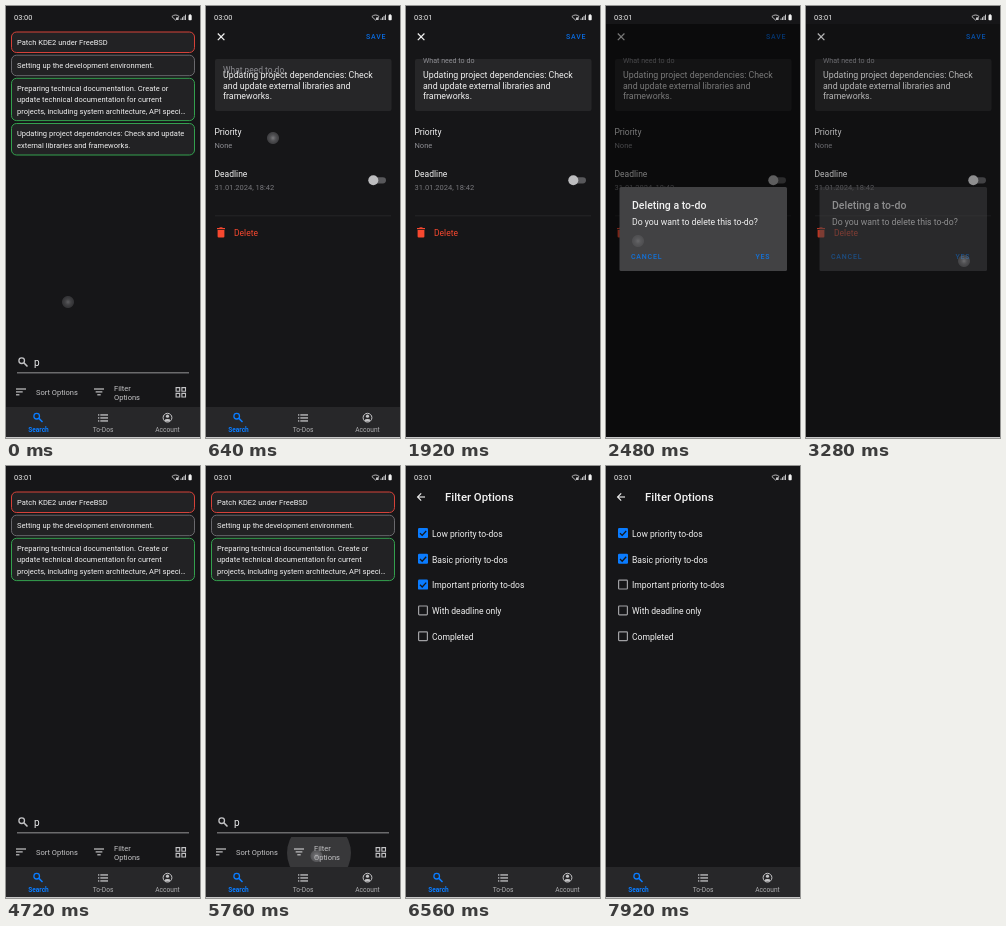
Animation of 194x432 px, one loop 8 s. Source, as an HTML page with a canvas:

```html
<!DOCTYPE html>
<html lang="en">
<head>
<meta charset="utf-8">
<title>To-do app</title>
<style>
html, body { margin: 0; width: 100%; height: 100%; overflow: hidden; background: #161618; }
canvas { display: block; width: 194px; height: 432px; }
</style>
</head>
<body>
<canvas id="stage"></canvas>
<script>
const W = 194, H = 432, LOOP = 8000, STEP = 80;
const BG = '#161618', BLUE = '#0a7cff', GRAY = '#8e8e93', WHITE = '#f2f2f2', LIGHT = '#c4c4c6';
const canvas = document.getElementById('stage');
const ctx = canvas.getContext('2d');
const dpr = window.devicePixelRatio || 1;
canvas.width = W * dpr;
canvas.height = H * dpr;

const ramp = (t, from, to) => Math.min(1, Math.max(0, (t - from) / (to - from)));
const easeOut = p => 1 - (1 - p) ** 2;
const between = (t, from, to) => t >= from && t < to;

function withAlpha(alpha, draw) {
  if (alpha <= 0) return;
  ctx.save();
  ctx.globalAlpha *= alpha;
  draw();
  ctx.restore();
}

// y is the vertical middle of the capital letters
function text(str, x, y, size, color = WHITE, { weight = 400, align = 'left', spacing = 0 } = {}) {
  ctx.font = `${weight} ${size}px Roboto, sans-serif`;
  ctx.textAlign = align;
  ctx.letterSpacing = spacing + 'px';
  ctx.fillStyle = color;
  ctx.fillText(str, x, y + size * 0.355);
}

function rect(x, y, w, h, color) {
  ctx.fillStyle = color;
  ctx.fillRect(x, y, w, h);
}

function rounded(x, y, w, h, r, fill, stroke, lineWidth = 1) {
  ctx.beginPath();
  ctx.roundRect(x, y, w, h, r);
  if (fill) { ctx.fillStyle = fill; ctx.fill(); }
  if (stroke) { ctx.strokeStyle = stroke; ctx.lineWidth = lineWidth; ctx.stroke(); }
}

function line(points, color, width = 1) {
  ctx.beginPath();
  points.forEach(([x, y]) => ctx.lineTo(x, y));
  ctx.strokeStyle = color;
  ctx.lineWidth = width;
  ctx.stroke();
}

function disc(x, y, r, color) {
  ctx.beginPath();
  ctx.arc(x, y, r, 0, 7);
  ctx.fillStyle = color;
  ctx.fill();
}

function ring(x, y, r, color, width) {
  ctx.beginPath();
  ctx.arc(x, y, r, 0, 7);
  ctx.strokeStyle = color;
  ctx.lineWidth = width;
  ctx.stroke();
}

function magnifier(x, y, color) {
  ring(x - 1.3, y - 1.3, 2.8, color, 1.3);
  line([[x + 0.9, y + 0.9], [x + 4.5, y + 4.5]], color, 1.5);
}

function touch(x, y, strength = 1) {
  const glow = ctx.createRadialGradient(x, y, 0, x, y, 6.5);
  glow.addColorStop(0, 'rgba(205,205,208,.55)');
  glow.addColorStop(0.45, 'rgba(170,170,174,.4)');
  glow.addColorStop(0.85, 'rgba(150,150,154,.32)');
  glow.addColorStop(1, 'rgba(150,150,154,0)');
  withAlpha(strength, () => disc(x, y, 6.5, glow));
}

function statusBar(t) {
  text(t < 1920 ? '03:00' : '03:01', 8, 11.2, 7.4, WHITE);
  ctx.beginPath();
  ctx.moveTo(169.5, 14);
  ctx.arc(169.5, 14, 5, -Math.PI * 0.76, -Math.PI * 0.24);
  ctx.closePath();
  ctx.strokeStyle = LIGHT;
  ctx.lineWidth = 0.9;
  ctx.stroke();
  rect(170, 11.5, 2.6, 2.5, LIGHT);
  for (let i = 0; i < 4; i++) rect(174.5 + i * 1.5, 12.5 - i * 1.3, 1, 1.5 + i * 1.3, LIGHT);
  rounded(182.5, 9, 3.2, 5.2, 0.7, WHITE);
  rect(183.4, 8.2, 1.4, 1, WHITE);
}

function tabBar() {
  rect(0, 401, W, 30, '#272729');
  magnifier(32, 411.5, BLUE);
  text('Search', 32.5, 423.3, 6.6, BLUE, { weight: 700, align: 'center' });
  for (let i = 0; i < 3; i++) {
    const y = 408.3 + i * 3;
    rect(92, y, 1.3, 1.3, LIGHT);
    rect(94.3, y, 7.7, 1.3, LIGHT);
  }
  text('To-Dos', 97, 423.3, 6.6, '#adadaf', { align: 'center' });
  ring(161.5, 411.7, 4.4, LIGHT, 1);
  disc(161.5, 410.2, 1.6, LIGHT);
  ctx.beginPath();
  ctx.ellipse(161.5, 414.2, 2.8, 1.3, 0, 0, 7);
  ctx.fill();
  text('Account', 161.5, 423.3, 6.6, '#adadaf', { align: 'center' });
}

function card(y, h, color, lines) {
  rounded(5.5, y, 183, h, 5, '#222224', color, 0.95);
  lines.forEach((str, i) => text(str, 11, y + 10.3 + i * 11.2, 7.53));
}

function sortIcon(x, y, centered) {
  [10, 6.7, 3.4].forEach((w, i) =>
    rect(centered ? x - w / 2 : x - 5, y - 3.6 + i * 2.9, w, 1.2, LIGHT));
}

function listScreen(lastCard) {
  rect(0, 18, W, 383, BG);
  card(26, 20.5, '#e0443a', ['Patch KDE2 under FreeBSD']);
  card(49.2, 20.5, '#6e6e72', ['Setting up the development environment.']);
  card(72.3, 42.3, '#35a852', [
    'Preparing technical documentation. Create or',
    'update technical documentation for current',
    'projects, including system architecture, API speci…']);
  withAlpha(lastCard, () => card(117.5, 31.5, '#35a852', [
    'Updating project dependencies: Check and update',
    'external libraries and frameworks.']));
  magnifier(17, 356, LIGHT);
  text('p', 28, 356.3, 10);
  rect(11, 366.4, 172, 0.9, '#a2a2a5');
  sortIcon(15, 386, false);
  text('Sort Options', 30, 386.3, 7.53, LIGHT);
}

function listActions() {
  sortIcon(93, 386, true);
  text('Filter', 108, 382, 7.53, LIGHT);
  text('Options', 108, 391, 7.53, LIGHT);
  for (const x of [170.1, 175.9])
    for (const y of [381.6, 387.4]) rounded(x, y, 3.6, 3.6, 0, null, LIGHT, 1.1);
}

function filterRipple(t) {
  if (!between(t, 5760, 6240)) return;
  ctx.save();
  ctx.beginPath();
  ctx.rect(78, 371, 77, 30);
  ctx.clip();
  const grow = ramp(t, 5760, 5920);
  withAlpha(1 - ramp(t, 6000, 6240), () => disc(113 + 3 * grow, 387, 32 + 12 * grow, '#38383a'));
  ctx.restore();
}

function floatingLabel(p) {
  text('What need to do', 17, 67 - 13 * p, 8.8 - 1.7 * p, GRAY);
}

function editScreen(t) {
  rect(0, 18, W, 383, BG);
  line([[11.8, 27.5], [18.4, 34.1]], WHITE, 1.2);
  line([[18.4, 27.5], [11.8, 34.1]], WHITE, 1.2);
  text('SAVE', 160, 31, 7, '#0a6be0', { weight: 500, spacing: 0.8 });
  rounded(9, 53, 176.5, 52, 2, '#262628');
  floatingLabel(easeOut(ramp(t, 620, 800)));
  ['Updating project dependencies: Check', 'and update external libraries and', 'frameworks.']
    .forEach((str, i) => text(str, 17, 69 + i * 10.6, 8.8));
  text('Priority', 8.5, 126.2, 8.5);
  text('None', 8.5, 139.3, 7.53, GRAY);
  text('Deadline', 8.5, 168, 8.5);
  text('31.01.2024, 18:42', 8.5, 181.2, 7.53, '#77777b');
  rounded(164, 171.2, 16, 6.2, 3.1, '#58585b');
  disc(167.3, 174.3, 5, '#bdbdbf');
  rect(9, 209.5, 176, 0.7, '#2b2b2d');
  const red = '#f7482f';
  rect(11, 222, 8, 1.2, red);
  rect(13.5, 221.3, 3, 1, red);
  rounded(11.6, 224, 6.8, 7.6, [0, 0, 1, 1], red);
  text('Delete', 28, 227, 8.5, red);
}

function dialog() {
  rect(0, 18, W, 414, 'rgba(0,0,0,.5)');
  rounded(13.5, 181, 167.5, 84, 1.5, '#424244');
  text('Deleting a to-do', 26, 199, 10.5, WHITE, { weight: 500 });
  text('Do you want to delete this to-do?', 26, 216, 8.68);
  const button = { weight: 500, spacing: 0.8 };
  text('CANCEL', 25, 251, 7, '#1273dc', button);
  text('YES', 149.5, 251, 7, '#1273dc', button);
}

function checkbox(y, label, checked) {
  if (checked) {
    rounded(12, y - 5, 10, 10, 1.2, BLUE);
    line([[14, y + 0.2], [16.2, y + 2.4], [20.2, y - 2]], BG, 1.3);
  } else {
    rounded(12.6, y - 4.4, 8.8, 8.8, 0.8, null, '#a0a0a3', 1.2);
  }
  text(label, 26, y + 0.8, 8.55);
}

function filterScreen(t) {
  rect(0, 18, W, 383, BG);
  line([[19, 31], [11.8, 31]], WHITE, 1.1);
  line([[15.2, 27.4], [11.6, 31], [15.2, 34.6]], WHITE, 1.1);
  text('Filter Options', 39, 31.3, 11.4, WHITE, { weight: 500 });
  const ripple = easeOut(ramp(t, 7360, 7600));
  if (t >= 7440)
    withAlpha(0.16 * (1 - ramp(t, 7600, 7920)), () => disc(20, 118.5, 14 * ripple, '#fff'));
  ['Low priority to-dos', 'Basic priority to-dos', 'Important priority to-dos', 'With deadline only', 'Completed']
    .forEach((label, i) => checkbox(67 + i * 25.8, label, i < 2 || (i === 2 && t < 7520)));
}

function touches(t) {
  if (t < 160) touch(62, 296, t < 80 ? 0.72 : 0.3);
  if (between(t, 480, 800)) touch(67, 132, t < 720 ? 1 : 0.4);
  if (between(t, 2160, 2560)) touch(32, 235, 0.5);
  if (between(t, 3200, 3520)) touch(158, 255, 0.75);
  if (between(t, 5200, 6160)) touch(110.5, 390, t < 5760 ? 0.8 : t < 6080 ? 1.3 : 0.5);
  if (between(t, 7040, 7840)) touch(19.5, 120, 0.8);
}

function render(t) {
  ctx.setTransform(dpr, 0, 0, dpr, 0, 0);
  rect(0, 0, W, H, BG);

  const editShown = ramp(t, 480, 640) * (1 - ramp(t, 3280, 3440));
  const tabs = 1 - ramp(t, 640, 800) + ramp(t, 3280, 3440);
  const lastCard = t < 3200 ? 1 : 1 - ramp(t, 3240, 3490);

  if (editShown < 1) {
    listScreen(lastCard);
    filterRipple(t);
    listActions();
  }
  withAlpha(editShown, () => editScreen(t));
  withAlpha(easeOut(ramp(t, 6080, 6480)), () => filterScreen(t));
  withAlpha(tabs, tabBar);
  withAlpha(ramp(t, 2240, 2480) * (1 - ramp(t, 3200, 3360)), dialog);

  statusBar(t);
  touches(t);
  rect(0, 431, W, 1, '#c9c9c9');
}

function tick(now) {
  const t = now % LOOP;
  render(Math.floor(t / STEP) * STEP);
  requestAnimationFrame(tick);
}
requestAnimationFrame(tick);
</script>
</body>
</html>
```
